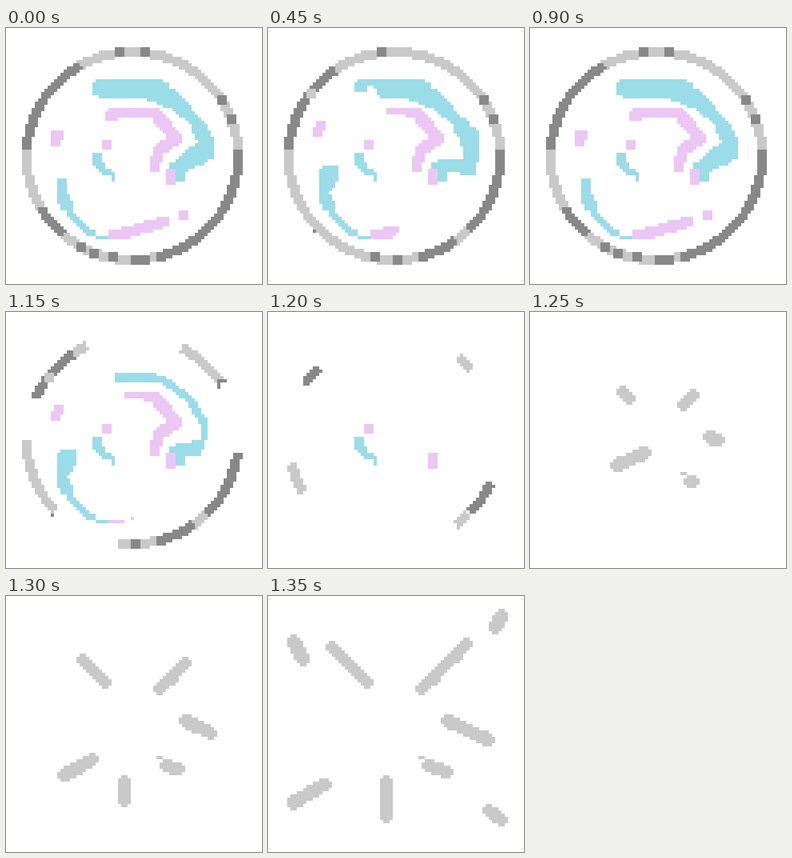
An HTML page with a canvas that plays this animation: 320 px wide and 320 px high, repeating every 1400 ms.

```html
<!DOCTYPE html>
<html lang="en">
<head>
<meta charset="utf-8">
<title>Bubble</title>
<style>
html, body { margin: 0; width: 100%; height: 100%; overflow: hidden; background: #fff; }
canvas { display: block; width: 100%; height: 100%; }
</style>
</head>
<body>
<canvas id="stage" width="320" height="320"></canvas>
<script>
const ctx = document.getElementById('stage').getContext('2d');
const CELL = 4, LOOP = 1400;
const LIGHT = '#c9c9c9', DARK = '#888888', CYAN = '#9adce8', PINK = '#ecc6f4';
const rad = deg => deg * Math.PI / 180;
const mix = (a, b, k) => a + (b - a) * k;

// All coordinates below are in cells of the 80 x 80 grid.
function rect(color, x, y, w, h = w) {
  ctx.fillStyle = color;
  ctx.fillRect(x * CELL, y * CELL, w * CELL, h * CELL);
}

// Drags a square brush through key points [x, y, width].
function stroke(color, points) {
  for (let i = 1; i < points.length; i++) {
    const [x0, y0, w0] = points[i - 1], [x1, y1, w1] = points[i];
    const steps = Math.ceil(2 * Math.hypot(x1 - x0, y1 - y0));
    for (let s = 0; s <= steps; s++) {
      const k = s / steps, w = Math.round(mix(w0, w1, k));
      rect(color, Math.round(mix(x0, x1, k) - w / 2), Math.round(mix(y0, y1, k) - w / 2), w);
    }
  }
}

// Part of the rim, angles in degrees clockwise from the right.
function rim(color, from, to) {
  for (let y = 0; y < 80; y++) {
    for (let x = 0; x < 80; x++) {
      const dx = x - 39, dy = y - 39.5;
      const outside = Math.hypot(dx / 34.5, dy / 34) > 1;
      const inside = Math.hypot(dx / 31.5, dy / 31) < 1;
      if (outside || inside) continue;
      const turn = Math.atan2(dy, dx) * 180 / Math.PI - from;
      if ((turn + 720) % 360 <= to - from) rect(color, x, y, 1);
    }
  }
}

// Square marks sitting on the rim.
function marks(color, ...angles) {
  for (const a of angles) {
    const x = Math.round(39 + 33 * Math.cos(rad(a)));
    const y = Math.round(39.49 + 32.5 * Math.sin(rad(a)));
    rect(color, x - 1, y - 1, 3);
  }
}

const lump = [[55, 43, 4], [52, 44, 2], [54.5, 46.5, 3]];
const bend = [[46, 19, 6], [54, 24, 4], [58.5, 28.5, 3]];
const swirl = [[17.5, 52.5, 3], [20.8, 59, 2], [25, 63, 2], [28.5, 65.5, 1], [31.5, 65.5, 1]];
const hook = [[28.5, 40.5, 3], [29, 42.5, 2], [31, 45, 2], [33.5, 45.5, 1], [33.5, 47.5, 1]];
const curl = [[46.5, 26.5, 3], [49, 29.5, 3], [53.2, 34.5, 3], [47.5, 38.5, 3], [46.5, 43.5, 3]];

function core() {
  stroke(CYAN, hook);
  rect(PINK, 30, 35, 3);
  rect(PINK, 50, 44, 3, 5);
}

function tallInside() {
  core();
  stroke(PINK, [[38, 26, 2], [43, 26, 2], ...curl]);
  stroke(CYAN, [[19.5, 45.5, 5], [18.5, 46.5, 5], [17.5, 50.5, 3], ...swirl]);
  rect(PINK, 15, 29, 3);
  rect(PINK, 14, 31, 3);
}

function wideBubble() {
  rim(LIGHT, 0, 360);
  rim(DARK, 183.5, 240);
  rim(DARK, -3.5, 77);
  rim(DARK, 80.5, 91);
  rim(DARK, 131.5, 150.5);
  marks(DARK, 263, 277, -32, -20.4, 100.5, 111.3, 119);
  stroke(CYAN, [[28.5, 18.5, 3], [32, 19, 6], ...bend, [61.8, 34, 4], [62.5, 38, 5], ...lump]);
  stroke(PINK, [[32.5, 27.5, 3], [34.5, 26.5, 3], ...curl]);
  core();
  rect(PINK, 14, 32, 4, 3);
  rect(PINK, 14, 35, 3, 2);
  stroke(CYAN, [[17.5, 48.5, 3], ...swirl]);
  stroke(PINK, [[33.5, 64.5, 3], [36, 64.5, 3], [49.5, 60.5, 3]]);
  rect(PINK, 54, 57, 3);
}

function tallBubble() {
  rim(LIGHT, 0, 360);
  rim(DARK, 183.5, 235.6);
  rim(DARK, -3.5, 77);
  rim(LIGHT, 45, 54);
  marks(LIGHT, 217);
  marks(DARK, 263, -32, -20.4, 100.5, 88);
  rect(DARK, 14, 63, 1);
  stroke(CYAN, [[28.5, 18.5, 3], [31, 17, 2], [34, 17, 2], [38, 19, 6], ...bend,
    [63.5, 35, 5], [63, 44, 4], [60, 43, 4], ...lump]);
  tallInside();
  stroke(PINK, [[33.5, 64.5, 3], [36, 64.5, 3], [40, 63, 2]]);
}

function breaking() {
  rim(DARK, 203.4, 235.6);
  rim(LIGHT, 235.6, 244);
  marks(LIGHT, 217);
  rim(LIGHT, -62, -33);
  rim(LIGHT, 137, 179.5);
  rim(DARK, 7, 77);
  rim(LIGHT, 45, 54);
  rim(LIGHT, 77, 98);
  marks(DARK, 88);
  rect(DARK, 66, 21, 3, 1);
  rect(DARK, 66, 22, 1, 2);
  rect(DARK, 14, 63, 1);
  stroke(CYAN, [[35.5, 20.5, 3], [42.5, 20.5, 3], [49, 21, 2], [57, 27, 2],
    [61.5, 34, 2], [62, 38, 2], [61.5, 40, 1], [59, 43, 4], ...lump]);
  tallInside();
  rect(PINK, 32, 65, 5, 1);
  rect(PINK, 39, 64, 1);
}

function fading() {
  rim(DARK, 212, 224);
  rim(LIGHT, -52, -42);
  rim(LIGHT, 150, 167);
  rim(DARK, 24, 44);
  rim(LIGHT, 45, 54);
  core();
}

// Rounded four-cell brush.
function ray(x0, y0, x1, y1) {
  const steps = Math.ceil(2 * Math.hypot(x1 - x0, y1 - y0));
  for (let s = 0; s <= steps; s++) {
    const x = Math.round(mix(x0, x1, s / steps)), y = Math.round(mix(y0, y1, s / steps));
    rect(LIGHT, x - 1, y - 2, 2, 4);
    rect(LIGHT, x - 2, y - 1, 4, 2);
  }
}

// Start, end and delay of each growing ray.
const rays = [
  [31, 27, 20, 16, 0], [48, 29, 62, 15, 0], [56, 39, 69, 45, 0], [50, 53, 56, 55, 0],
  [37, 58, 37, 69, 0.2],
  [8, 14, 11, 20, 0.6], [71, 10, 73, 6, 0.6], [69, 67, 73, 70, 0.6]
];

function splash(p) {
  for (const [x0, y0, x1, y1, delay] of rays) {
    const k = (p - delay) / (1 - delay);
    if (k > 0) ray(x0, y0, mix(x0, x1, k), mix(y0, y1, k));
  }
  const k = (p - 0.2) / 0.8;
  ray(mix(36, 18, k), mix(44, 58.5, k), mix(27, 8, k), mix(48, 64.5, k));
  rect(LIGHT, 47, 50, 2, 1);
}

const poses = [
  [0, wideBubble], [450, tallBubble], [900, wideBubble], [1150, breaking], [1200, fading],
  [1250, () => splash(0.2)], [1300, () => splash(0.6)], [1350, () => splash(1)]
];

let shown = -1;
const start = performance.now();

function tick() {
  const t = (performance.now() - start) % LOOP;
  let i = poses.length - 1;
  while (poses[i][0] > t) i--;
  if (i !== shown) {
    shown = i;
    rect('#fff', 0, 0, 80);
    poses[i][1]();
  }
  requestAnimationFrame(tick);
}
tick();
</script>
</body>
</html>
```
